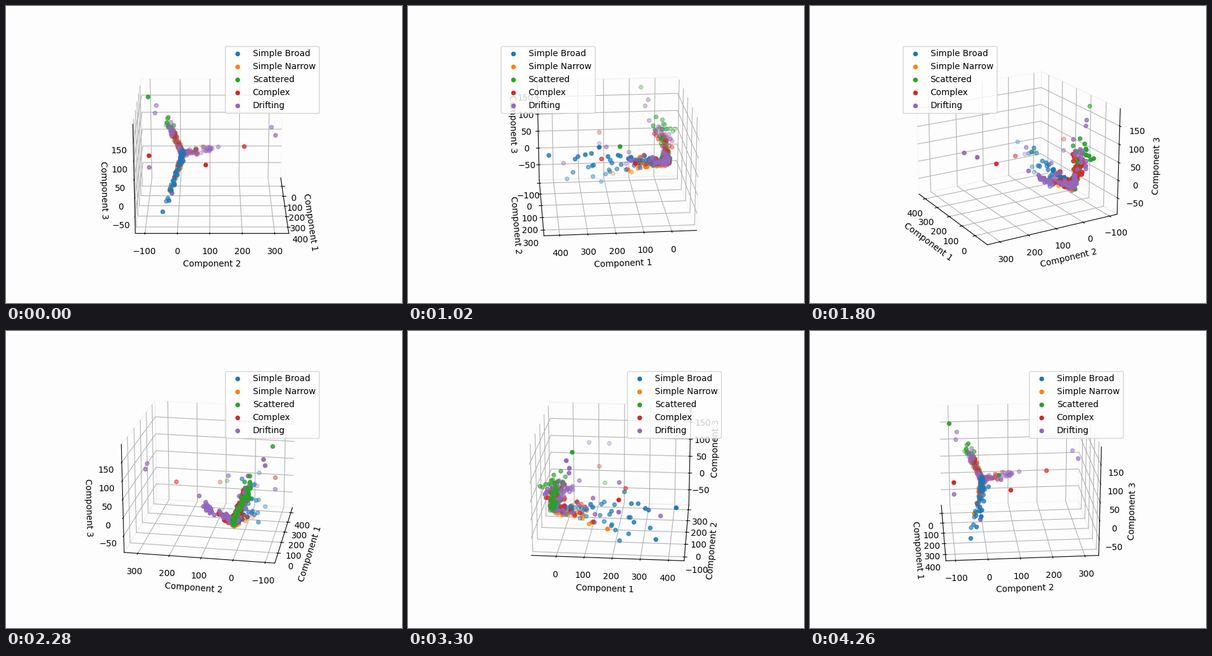
Recreate the animation shown at these times as a matplotlib script. Size 640 px wide and 480 px high, loop 4.32 s.

```python
import numpy as np
import matplotlib.pyplot as plt
from matplotlib.animation import FuncAnimation

FRAMES, INTERVAL, STEP = 72, 60, 5
PAPER = "#fdfdfd"
CORE = np.array([-32, 7, -7])
rng = np.random.default_rng(7)


def arm(n, axis, fan, power=2.2, start=0.0):
    """Points that leave the core along an axis, thinning out and fanning apart."""
    t = start + (1 - start) * rng.random((n, 1)) ** power
    g = np.clip(rng.normal(size=(n, 1)), -1.8, 1.8)
    jitter = np.clip(rng.normal(size=(n, 3)), -2, 2) * (5, 2.5, 4)
    return CORE + t * axis + t * g * fan + jitter


def plume(n, height):
    """A rising arm that leans towards negative y."""
    return arm(n, np.array([0.2, -0.5, 1]) * height, np.array([28, 5, 8]), 2.2)


def tail(n, length, start=0.0, power=2.2):
    """A long arm along x, spread in y and z together."""
    axis = np.array([1, -0.07, -0.01]) * length
    return arm(n, axis, np.array([0, 0.05, 0.11]) * length, power, start)


def branch(n, length):
    """An arm along y that climbs a little."""
    return arm(n, np.array([0.45, 1, 0.26]) * length, np.array([20, 8, 6]), 2.2)


# arms plus the few far strays that set the outline
groups = {
    "Simple Broad": [tail(70, 190), tail(16, 390, 0.5, 1.2),
                     [(420, -18, 11), (350, -48, -69), (218, -41, -78)]],
    "Simple Narrow": [tail(60, 150) - (0, 0, 7), [(173, -28, -51)]],
    "Scattered": [plume(75, 100), [(58, -101, 178), (155, 54, 52)]],
    "Complex": [plume(40, 80), branch(28, 95), tail(14, 160),
                [(116, 212, 51), (228, 87, 28), (220, -94, 52)]],
    "Drifting": [plume(40, 100), branch(48, 110), tail(16, 170),
                 [(67, 302, 94), (144, 312, 90), (220, -94, 19),
                  (33, -76, 148), (44, -80, 129), (364, -18, -13),
                  (207, 57, 53)]],
}

fig = plt.figure(figsize=(6.4, 4.8), dpi=100, facecolor=PAPER)
ax = fig.add_subplot(projection="3d", facecolor=PAPER)

for label, parts in groups.items():
    x, y, z = np.vstack(parts).T
    ax.scatter(x, y, z, label=label)

ax.set(xlabel="Component 1", ylabel="Component 2", zlabel="Component 3",
       xlim=(-89.5, 455.5), ylim=(-129.5, 343.5), zlim=(-96.4, 197),
       xticks=range(0, 401, 100), yticks=range(-100, 301, 100),
       zticks=range(-50, 151, 50))
for axis in (ax.xaxis, ax.yaxis, ax.zaxis):
    axis.pane.set_fill(False)
legend = ax.legend(loc="upper right")


def update(i):
    ax.view_init(elev=20, azim=i * STEP)
    # the legend hops away while the tall plume passes behind it
    legend.set_loc("upper left" if 11 <= i < 34 else "upper right")
    return []


anim = FuncAnimation(fig, update, frames=FRAMES, interval=INTERVAL,
                     repeat=True, repeat_delay=0)
plt.show()
```
